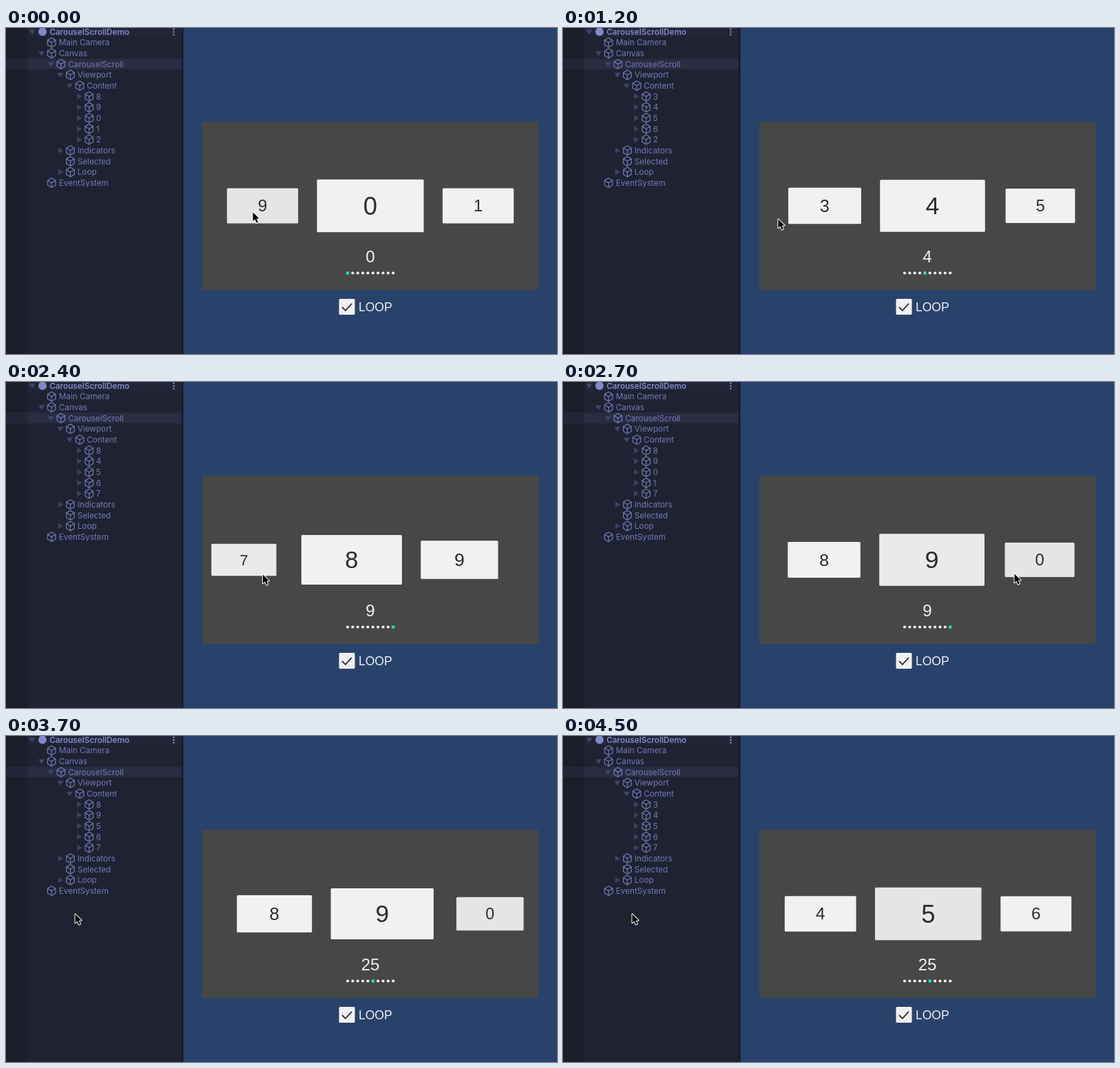
These frames come from a looping animation (800x473 px, 4.6 s). An HTML page with a canvas:

```html
<!DOCTYPE html>
<html lang="en">
<head>
<meta charset="utf-8">
<title>Carousel</title>
<style>
  html, body { margin: 0; width: 100%; height: 100%; overflow: hidden; background: #28426c; }
  canvas { display: block; width: 800px; height: 473px; }
</style>
</head>
<body>
<canvas id="stage" width="800" height="473"></canvas>
<script>
const ctx = document.getElementById('stage').getContext('2d');
const LOOP = 4600, STEP = 100;
const MID = 529, CARD_Y = 258, GAP = 156.5;
const UI = 'Inter, sans-serif', SANS = '"Liberation Sans", Arial, sans-serif';
const INK = '#727bba', LIGHT = '#f1f1f1';

const mod = (a, n) => ((a % n) + n) % n;

// Pointer path: time, x, y
const path = [
  [0, 358, 267], [100, 368, 268], [550, 647, 273], [690, 640, 275],
  [800, 368, 278], [900, 314, 278], [1200, 312, 277], [1300, 335, 277],
  [1700, 712, 274], [2120, 712, 274], [2270, 400, 278], [2350, 365, 279],
  [2450, 390, 279], [2600, 545, 279], [2700, 655, 278], [2850, 762, 276],
  [3000, 772, 274], [3300, 700, 272], [3420, 700, 272], [3600, 100, 258],
  [4600, 100, 258]
];

// Each swipe: pressed, drag begins, released, item to settle on,
// and how many items are still left to travel at a later moment
const swipes = [
  { press: 600, drag: 690, release: 815, to: 4, at: 1200, left: 0.048, slot: 1 },
  { press: 1900, drag: 2120, release: 2270, to: 9, at: 2700, left: 0.042, slot: 0 },
  { press: 3330, drag: 3420, release: 3617, to: 25, at: 4500, left: 0.008, slot: 0 }
];

// Monotone cubic interpolation along the path
function pointer(t) {
  let i = 0;
  while (i < path.length - 2 && t >= path[i + 1][0]) i++;
  const slope = (j, c) => j < 0 || j > path.length - 2 ? 0 :
    (path[j + 1][c] - path[j][c]) / (path[j + 1][0] - path[j][0]);
  const tangent = (j, c) => {
    const a = slope(j - 1, c), b = slope(j, c);
    return a * b > 0 ? 2 * a * b / (a + b) : 0;
  };
  const span = path[i + 1][0] - path[i][0], u = (t - path[i][0]) / span;
  const at = c => {
    const p = path[i][c], q = path[i + 1][c];
    return p + (q - p) * u * u * (3 - 2 * u) +
      span * u * (1 - u) * (tangent(i, c) * (1 - u) - tangent(i + 1, c) * u);
  };
  return { x: at(1), y: at(2) };
}

// Scroll position in items
function scroll(t) {
  let s = 0;
  for (const [i, w] of swipes.entries()) {
    if (t < w.drag) break;
    const dragged = end => s + (pointer(w.drag).x - pointer(end).x) / GAP;
    if (t < w.release) return dragged(t);
    const gap = w.to - dragged(w.release);
    const rate = Math.log(gap / w.left) / (w.at - w.release);
    const next = swipes[i + 1];
    if (!next || t < next.drag) return w.to - gap * Math.exp(-rate * (t - w.release));
    s = w.to;
  }
  return s;
}

function selected(t) {
  return swipes.reduce((v, w) => t >= w.release ? w.to : v, 0);
}

function cardBox(k, s) {
  const x = MID + (k - s) * GAP;
  const scale = Math.max(0.5, 1 - Math.abs(k - s) / 3);
  return { x, scale, w: 155 * scale, h: 76.6 * scale };
}

function shadeAt(k, t) {
  const w = swipes.filter(v => t >= v.press).pop();
  if (w && w.slot === mod(k, 5)) return t < w.drag ? 198 : 229;
  const b = cardBox(k, scroll(t)), p = pointer(t);
  const over = Math.abs(p.x - b.x) < b.w / 2 && Math.abs(p.y - CARD_Y) < b.h / 2;
  return over ? 229 : 241;
}

// Button tint fades over a tenth of a second
function shade(k, t) {
  let sum = 0;
  for (let i = 0; i < 5; i++) sum += shadeAt(k, Math.max(0, t - i * 20));
  return Math.round(sum / 5);
}

function rect(x, y, w, h, fill, r = 0) {
  ctx.fillStyle = fill;
  ctx.beginPath();
  ctx.roundRect(x, y, w, h, r);
  ctx.fill();
}

function disc(x, y, r, fill) {
  ctx.fillStyle = fill;
  ctx.beginPath();
  ctx.arc(x, y, r, 0, Math.PI * 2);
  ctx.fill();
}

function poly(points, close = true) {
  ctx.beginPath();
  points.forEach(([x, y]) => ctx.lineTo(x, y));
  if (close) ctx.closePath();
}

function label(str, x, y, font, fill, align = 'left') {
  ctx.font = font;
  ctx.fillStyle = fill;
  ctx.textAlign = align;
  ctx.fillText(str, x, y);
}

function cube(x, y) {
  const corner = i => {
    const a = Math.PI / 6 + i * Math.PI / 3;
    return [x + 6.7 * Math.cos(a), y + 6.9 * Math.sin(a)];
  };
  ctx.strokeStyle = INK;
  ctx.lineWidth = 1.2;
  ctx.lineJoin = 'round';
  poly([0, 1, 2, 3, 4, 5].map(corner));
  ctx.stroke();
  for (const i of [0, 2, 4].map(n => n === 0 ? 1 : n + 1)) {
    // spokes: down, upper left, upper right
    const end = i === 1 ? corner(1) : corner(i);
    poly([[x, y], end], false);
    ctx.stroke();
  }
}

function arrow(x, y, open) {
  ctx.fillStyle = open ? '#41466b' : '#3c4063';
  poly(open ? [[x - 4.5, y - 3], [x + 4.5, y - 3], [x, y + 4]]
            : [[x - 3, y - 4.5], [x + 4.5, y], [x - 3, y + 4.5]]);
  ctx.fill();
}

function sidebar(t) {
  rect(0, 0, 256, 473, '#1f2230');
  rect(0, 0, 256, 13, '#222535');
  rect(0, 0, 31, 473, '#1b1d29');
  rect(0, 44.5, 256, 15.6, '#2a2c40');
  rect(0, 44.5, 31, 15.6, '#242637');
  rect(255, 0, 2.5, 473, '#171924');

  // The tree refreshes only a few times per second
  const tick = Math.max(0, Math.floor((t - 67) / 200) * 200 + 67);
  const first = Math.round(scroll(tick)) - 2;
  const items = [3, 4, 0, 1, 2].map(slot =>
    [String(mod(first + mod(slot - first, 5), 10)), 5, 'shut']);
  const rows = [
    ['CarouselScrollDemo', 0, 'open'], ['Main Camera', 1], ['Canvas', 1, 'open'],
    ['CarouselScroll', 2, 'open'], ['Viewport', 3, 'open'], ['Content', 4, 'open'],
    ...items,
    ['Indicators', 3, 'shut'], ['Selected', 3], ['Loop', 3, 'shut'], ['EventSystem', 1]
  ];
  rows.forEach(([name, depth, fold], i) => {
    const y = 5.4 + 15.66 * i;
    if (fold) arrow(38 + 13.6 * depth, y, fold === 'open');
    if (i) cube(52.5 + 13.65 * depth, y);
    else disc(53, y, 6, '#8189c6');
    label(name, 63.2 + 13.5 * depth, y + 4.3, (i ? '400' : '600') + ' 11.75px ' + UI,
      i ? INK : '#8189c6');
  });
  for (let i = 0; i < 3; i++) disc(243.5, 1.8 + i * 4, 1.2, '#8a91cb');
}

function carousel(t) {
  rect(285, 136, 488.5, 244, '#474746', 1);
  const s = scroll(t), c = Math.round(s);
  ctx.save();
  ctx.beginPath();
  ctx.rect(294, 136, 470, 244);
  ctx.clip();
  for (let k = c - 2; k <= c + 2; k++) {
    const b = cardBox(k, s), v = shade(k, t), size = 36.5 * b.scale;
    rect(b.x - b.w / 2, CARD_Y - b.h / 2, b.w, b.h, `rgb(${v},${v},${v})`, 1.5);
    label(String(mod(k, 10)), b.x, CARD_Y + size * 0.345, `${size}px ${SANS}`, '#2b2b2b', 'center');
  }
  ctx.restore();

  const pick = selected(t);
  label(String(pick), MID, 339.5, '24px ' + SANS, LIGHT, 'center');
  for (let i = 0; i < 10; i++) {
    const x = 496 + 7.35 * i;
    if (i === pick % 10) rect(x - 2.2, 353.3, 4.4, 4.4, '#22d8bd', 1);
    else disc(x, 355.5, 2.1, LIGHT);
  }
}

function toggle() {
  rect(483.5, 393, 23, 23, LIGHT, 1.5);
  ctx.strokeStyle = '#333';
  ctx.lineWidth = 1.9;
  ctx.lineJoin = 'miter';
  poly([[488, 405], [492.8, 409.8], [502, 399.8]], false);
  ctx.stroke();
  label('LOOP', 512, 411, '17.5px ' + SANS, LIGHT);
}

function cursor({ x, y }) {
  ctx.save();
  ctx.translate(x, y);
  poly([[0.5, 0.5], [0.5, 13.2], [3.4, 10.5], [5.7, 15.6], [8, 14.6], [5.7, 9.7], [9.6, 9.5]]);
  ctx.lineJoin = 'round';
  ctx.lineWidth = 2;
  ctx.strokeStyle = '#fff';
  ctx.stroke();
  ctx.fillStyle = '#000';
  ctx.fill();
  ctx.restore();
}

function draw(t) {
  rect(0, 0, 800, 473, '#28426c');
  sidebar(t);
  carousel(t);
  toggle();
  cursor(pointer(t));
}

const start = performance.now();
function frame(now) {
  const t = Math.max(0, now - start) % LOOP;
  draw(Math.floor(t / STEP) * STEP);
  requestAnimationFrame(frame);
}
draw(0);
requestAnimationFrame(frame);
</script>
</body>
</html>
```
